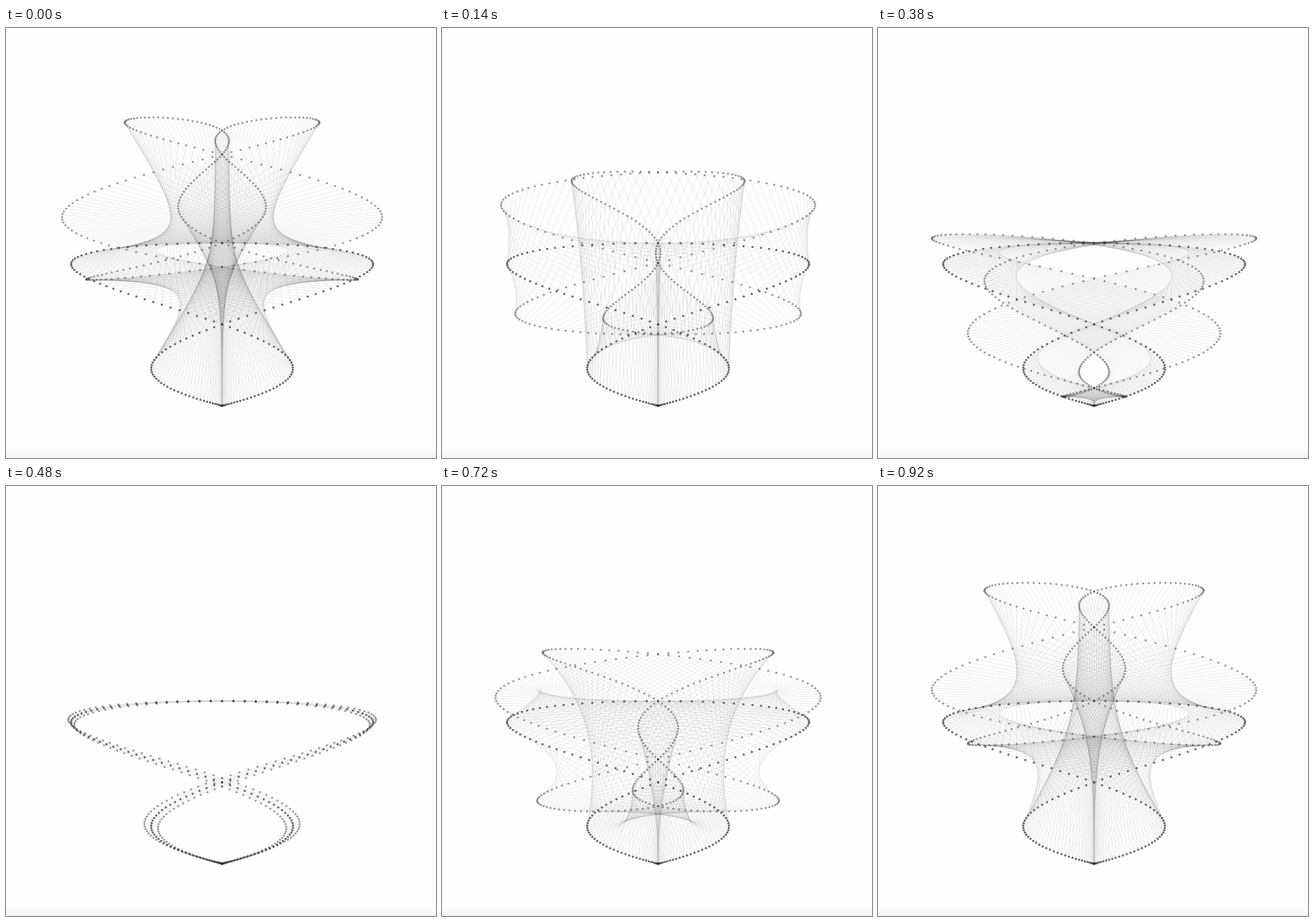
These frames come from a looping animation (600 by 600 pixels, 980 ms). An HTML page:

```html
<!DOCTYPE html>
<html lang="en">
<head>
<meta charset="utf-8">
<title>String curves</title>
<style>
  html, body { margin: 0; width: 100%; height: 100%; overflow: hidden; background: #fefefe; }
  svg { display: block; width: 100%; height: 100%; }
  #figure { filter: blur(.5px); }
</style>
</head>
<body>
<svg viewBox="0 0 600 600">
  <defs>
    <linearGradient id="shade" x1="0" y1="0" x2="0" y2="1">
      <stop offset="0" stop-color="#fefefe"/>
      <stop offset="1" stop-color="#f3f3f3"/>
    </linearGradient>
  </defs>
  <rect width="600" height="600" fill="#fefefe"/>
  <rect y="586" width="600" height="14" fill="url(#shade)"/>
  <g id="figure">
    <g id="lines" stroke="#000" stroke-opacity=".07" stroke-width="1"></g>
    <g id="dots" fill="#333" fill-opacity=".48"></g>
  </g>
</svg>
<script>
const COUNT = 360, CX = 301.5, CY = 300, R = 227;
const LOOP = 980, TICK = 20;
const START = 123, TURN = 8;   // degrees

// Tick at which each pose begins; one pose is skipped after SKIP
const STEPS = [0, 1, 3, 4, 6, 7, 9, 11, 12, 14, 15, 17, 19, 20, 22, 23, 25, 26, 27,
               29, 31, 33, 34, 36, 38, 40, 41, 43, 44, 46];
const SKIP = 18;

const rad = deg => deg * Math.PI / 180;

function point(deg, phase) {
  const t = rad(deg), s = rad(deg + phase);
  return [CX + R * Math.cos(t) * Math.sin(4 * s),
          CY + R * Math.sin(t) * Math.sin(s)];
}

function add(id, tag, attrs) {
  const el = document.createElementNS("http://www.w3.org/2000/svg", tag);
  set(el, attrs);
  return document.getElementById(id).appendChild(el);
}

function set(el, attrs) {
  for (const k in attrs) {
    const v = attrs[k];
    el.setAttribute(k, typeof v === "number" ? v.toFixed(2) : v);
  }
}

const strings = Array.from({ length: COUNT }, (_, i) => {
  const [x, y] = point(i, 0);
  add("dots", "circle", { cx: x, cy: y, r: 1.5 });
  return {
    line: add("lines", "line", { x1: x, y1: y }),
    dot: add("dots", "circle", { r: 1.5 })
  };
});

function draw(phase) {
  strings.forEach(({ line, dot }, i) => {
    const [x, y] = point(i, phase);
    set(line, { x2: x, y2: y });
    set(dot, { cx: x, cy: y });
  });
}

function phaseAt(ms) {
  const tick = (ms % LOOP) / TICK;
  let k = STEPS.length - 1;
  while (STEPS[k] > tick) k--;
  return START - TURN * (k > SKIP ? k + 1 : k);
}

const origin = performance.now();
let last = null;

function frame(now) {
  const phase = phaseAt(Math.max(0, now - origin));
  if (phase !== last) draw(last = phase);
  requestAnimationFrame(frame);
}

frame(origin);
</script>
</body>
</html>
```
